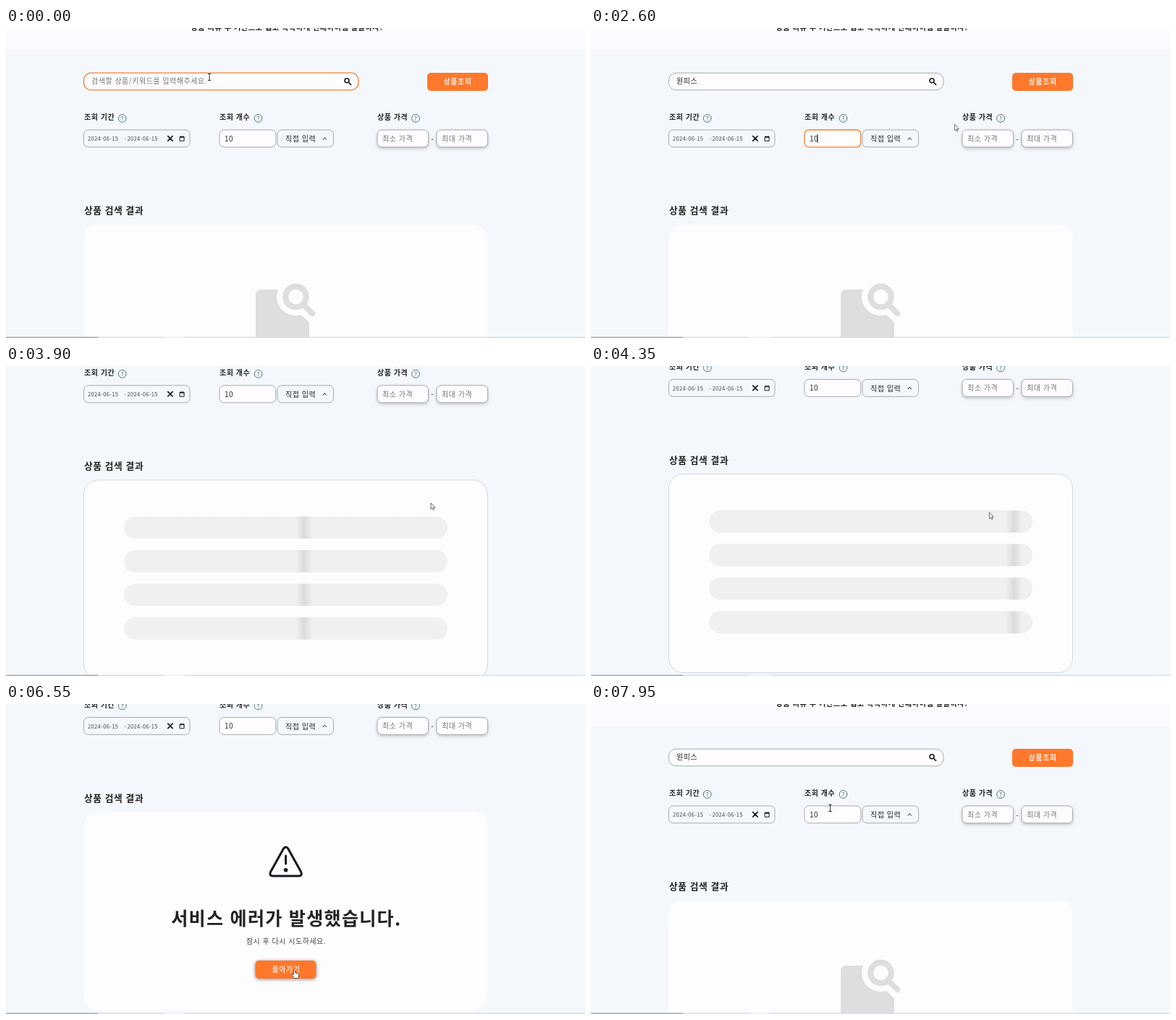
Animation of 800x429 px, one loop 8 s. Source, as an HTML page:

```html
<!DOCTYPE html>
<html lang="ko">
<head>
<meta charset="utf-8">
<title>상품 검색</title>
<style>
  html, body { margin: 0; height: 100%; overflow: hidden; background: #f4f8fd; }
  svg { display: block; width: 800px; height: 429px; }
  text { font: 10px "Noto Sans CJK KR", "Noto Sans CJK", "Noto Sans", sans-serif; letter-spacing: .05em; fill: #222; }
  .bold { font-weight: 700; }
  .hint { fill: #777; }
  .note { fill: #606060; }
  .mid { text-anchor: middle; }
  .date { font-size: 7.5px; fill: #444; }
  .box { fill: #fefcff; stroke: #a6abb0; }
  .clear { fill: #f4f7fc; }
  .focus { stroke: #f5812f; stroke-width: 1.3; }
  .button { fill: #ff782b; }
  .button + text { fill: #fff0e6; font-weight: 700; }
  .shadow { filter: drop-shadow(0 2px 2px #0003); }
  .raised { filter: drop-shadow(0 1.5px 2.5px #0007); }
  .card { fill: #fdfcff; }
  .line { fill: none; stroke: #16181d; stroke-linecap: round; stroke-linejoin: round; }
  .caret { stroke: #111; }
  .cursor { fill: #fff; stroke: #444; stroke-width: .8; stroke-linejoin: round; }
</style>
</head>
<body>
<svg viewBox="0 0 800 429">
  <defs>
    <g id="help">
      <circle r="5.4" fill="none" stroke="#55747f"/>
      <text class="mid" x=".2" y="3" style="font-size:8px;fill:#41636f">?</text>
    </g>
    <linearGradient id="shimmer" gradientUnits="userSpaceOnUse" x1="-11" x2="11">
      <stop offset="0" stop-color="#f0eff1"/>
      <stop offset=".5" stop-color="#dad9db"/>
      <stop offset="1" stop-color="#f0eff1"/>
    </linearGradient>
  </defs>

  <rect width="800" height="429" fill="#f4f8fd"/>
  <g id="page">
    <rect width="800" height="30" fill="#fdfaff"/>
    <text class="bold mid" x="388" y="2.6" style="font-size:10.2px">상품 리뷰 수 기반으로 쉽고 똑똑하게 판매아이템 발굴하자!</text>

    <rect id="search" class="box" x="107.5" y="62.2" width="379.5" height="23.6" rx="10"/>
    <text id="query" x="118" y="77.2"></text>
    <path id="queryCaret" class="caret" d="M0 68V80"/>
    <g class="line" stroke-width="1.6"><circle cx="471" cy="72.8" r="3"/><path d="M473.4 75.2L476.6 78.4"/></g>
    <rect class="button" x="582" y="62" width="84" height="25" rx="5"/>
    <text class="mid" x="624" y="77.7">상품조회</text>

    <text class="bold" x="108" y="127">조회 기간</text>
    <use href="#help" x="160.7" y="125"/>
    <text class="bold" x="295" y="127">조회 개수</text>
    <use href="#help" x="348.5" y="125"/>
    <text class="bold" x="513" y="127">상품 가격</text>
    <use href="#help" x="566" y="125"/>

    <rect class="box clear" x="107.5" y="141" width="146.5" height="23.8" rx="6"/>
    <text class="date" x="113" y="156">2024-06-15</text>
    <text class="date" x="163.5" y="156">-</text>
    <text class="date" x="167.5" y="156">2024-06-15</text>
    <path class="line" stroke-width="1.7" d="M223.7 149.7l6.4 6.4m0-6.4l-6.4 6.4"/>
    <path class="line" d="M240.5 150.5h5.6v5.8h-5.6zm0 .8h5.6m-4.3-1.8v1m3-1v1"/>

    <rect id="count" class="box" x="295" y="141" width="77.8" height="23.8" rx="6"/>
    <text x="302" y="156.9">10</text>
    <path id="countCaret" class="caret" d="M313 147V159"/>
    <rect class="box clear" x="375" y="141" width="77.5" height="23.8" rx="6"/>
    <text x="386" y="157">직접 입력</text>
    <path class="line" d="M438 154.3l2.3-2.6 2.3 2.6"/>

    <g class="shadow">
      <rect class="box" x="513" y="141" width="70.5" height="23.8" rx="6"/>
      <rect class="box" x="595" y="141" width="70.5" height="23.8" rx="6"/>
    </g>
    <text class="hint" x="520" y="156.8">최소 가격</text>
    <text x="587.3" y="157.5">-</text>
    <text class="hint" x="602" y="156.8">최대 가격</text>

    <text class="bold" x="108" y="257.4" style="font-size:12.7px">상품 검색 결과</text>
    <rect id="card" class="card" x="107.5" y="272" width="558" height="275" rx="20"/>

    <g id="empty">
      <path fill="#dedde0" d="M353 362H376A26 26 0 0 0 408 396.7L419 407.5V427Q419 435 411 435H353Q345 435 345 427V370Q345 362 353 362Z"/>
      <g fill="none" stroke="#dedde0" stroke-width="8" stroke-linecap="round">
        <circle cx="400.5" cy="372" r="14.3"/><path d="M411 383L423.3 395"/>
      </g>
      <text class="bold mid note" x="387" y="454.7">상품을 검색해주세요.</text>
      <text class="bold mid note" x="387" y="469.4" style="font-size:10.2px">카테고리 또는 검색어를 직접 입력하실 수 있습니다.</text>
    </g>

    <g id="skeleton" fill="url(#shimmer)">
      <rect x="163" y="322.3" width="447" height="30.8" rx="15.4"/>
      <rect x="163" y="368.8" width="447" height="30.8" rx="15.4"/>
      <rect x="163" y="415.3" width="447" height="30.8" rx="15.4"/>
      <rect x="163" y="461.8" width="447" height="30.8" rx="15.4"/>
    </g>

    <g id="error">
      <g class="line" stroke-width="3" transform="translate(0 122.5)">
        <path d="M383.4 200.2Q386.6 195.6 389.8 200.2L407.6 232.3Q410 238 404.5 238H368.7Q363.2 238 365.6 232.3Z"/>
        <path d="M386.6 210V221"/><path stroke-width="5.6" d="M386.6 229.8h.01"/>
      </g>
      <text class="bold mid" x="387.3" y="428.8" style="font-size:25.1px">서비스 에러가 발생했습니다.</text>
      <text class="mid" x="387" y="454" style="fill:#444">잠시 후 다시 시도하세요.</text>
      <rect class="button raised" x="344.5" y="477.5" width="84" height="25" rx="5"/>
      <text class="mid" x="387" y="493.6" style="fill:#f8dccb">돌아가기</text>
    </g>
  </g>

  <g id="taskbar">
    <rect y="427.4" width="800" height="2" fill="#d3e3ec"/>
    <rect y="427.4" width="127" height="2" fill="#b4b1b1"/>
    <rect x="218" y="427.4" width="30" height="2" fill="#f1f5f8"/>
  </g>

  <g id="cursor">
    <path id="arrow" class="cursor" d="M0 0V8.6L2 6.9 3.3 9.7 4.7 9 3.4 6.3H5.9Z"/>
    <path id="beam" class="line" stroke-width=".9" d="M-1.8-4.5H1.8M-1.8 4.5H1.8M0-4.5V4.5"/>
    <path id="hand" class="cursor" d="M-1 1Q0-.6 1 1V4.5L5 5.5Q6.4 6 6 8L5 12H0L-3.4 7.6Q-3.6 6-1 7Z"/>
  </g>
</svg>
<script>
const LOOP = 8000;
const el = Object.fromEntries([...document.querySelectorAll('[id]')].map(e => [e.id, e]));

// Rows are [time, ...values]
const scrollTrack = [
  [3700, 0], [3750, 14], [3800, 58], [3850, 96], [3900, 114], [4000, 122.5],
  [7500, 122.5], [7550, 114.6], [7600, 62], [7650, 22], [7700, 5], [7950, 0]
];
const mouseTrack = [
  [0, 281, 68], [100, 289.5, 64.5], [1780, 289.5, 64.5], [2150, 333, 153], [2330, 333, 153],
  [2600, 502, 133.5], [3050, 648, 74], [3250, 648, 74], [3650, 587, 189.5], [4000, 587, 189.5],
  [4350, 550.5, 202.5], [4850, 511, 237], [5050, 498.5, 243], [6170, 498, 243],
  [6550, 398.5, 367.5], [6950, 398.5, 367.5], [7350, 499.5, 274], [7600, 499.5, 274], [7950, 330.5, 144]
];
const typing = [
  [300, 'ㅇ'], [800, '우'], [850, '워'], [950, '원'], [1050, '원ㅍ'],
  [1100, '원피'], [1200, '원핏'], [1300, '원피스']
];

function sample(track, t) {
  const i = track.findIndex(row => row[0] > t);
  if (i === 0) return track[0].slice(1);
  if (i < 0) return track.at(-1).slice(1);
  const a = track[i - 1], b = track[i], k = (t - a[0]) / (b[0] - a[0]);
  return a.slice(1).map((v, n) => v + (b[n + 1] - v) * k);
}

const between = (v, from, to) => v >= from && v < to;
const show = (node, on) => node.style.display = on ? '' : 'none';

function cursorKind(x, y, state) {
  const inside = (l, t, r, b) => between(x, l, r) && between(y, t, b);
  if (inside(107, 62, 460, 86) || inside(295, 141, 373, 165)) return 'beam';
  if (inside(582, 62, 666, 87) || state === 'error' && inside(344, 477, 429, 503)) return 'hand';
  return 'arrow';
}

function draw(t) {
  const state = between(t, 3200, 5800) ? 'skeleton' : between(t, 5800, 6900) ? 'error' : 'empty';
  for (const name of ['empty', 'skeleton', 'error']) show(el[name], name === state);
  el.card.setAttribute('stroke', state === 'skeleton' ? '#d2d9df' : 'none');
  el.error.setAttribute('opacity', Math.min(1, Math.max(0, (t - 5750) / 200)));
  el.shimmer.setAttribute('gradientTransform', `translate(${335 + (t - 3700) * .383})`);

  const [scroll] = sample(scrollTrack, t);
  el.page.setAttribute('transform', `translate(0 ${-scroll})`);

  const typed = typing.findLast(([start]) => t >= start)?.[1];
  el.query.textContent = typed ?? '검색할 상품/키워드를 입력해주세요.';
  el.query.classList.toggle('hint', !typed);
  el.search.classList.toggle('focus', t < 2300);
  el.count.classList.toggle('focus', between(t, 2300, 3200));
  show(el.queryCaret, between(t, 300, 1800));
  show(el.countCaret, between(t, 2300, 2800));
  if (typed) el.queryCaret.setAttribute('transform', `translate(${118.5 + el.query.getComputedTextLength()})`);

  const [x, y] = sample(mouseTrack, t);
  const kind = cursorKind(x, y + scroll, state);
  for (const name of ['arrow', 'beam', 'hand']) show(el[name], name === kind);
  el.cursor.setAttribute('transform', `translate(${x} ${y})`);
}

function tick() {
  draw(performance.now() % LOOP);
  requestAnimationFrame(tick);
}
tick();
</script>
</body>
</html>
```
